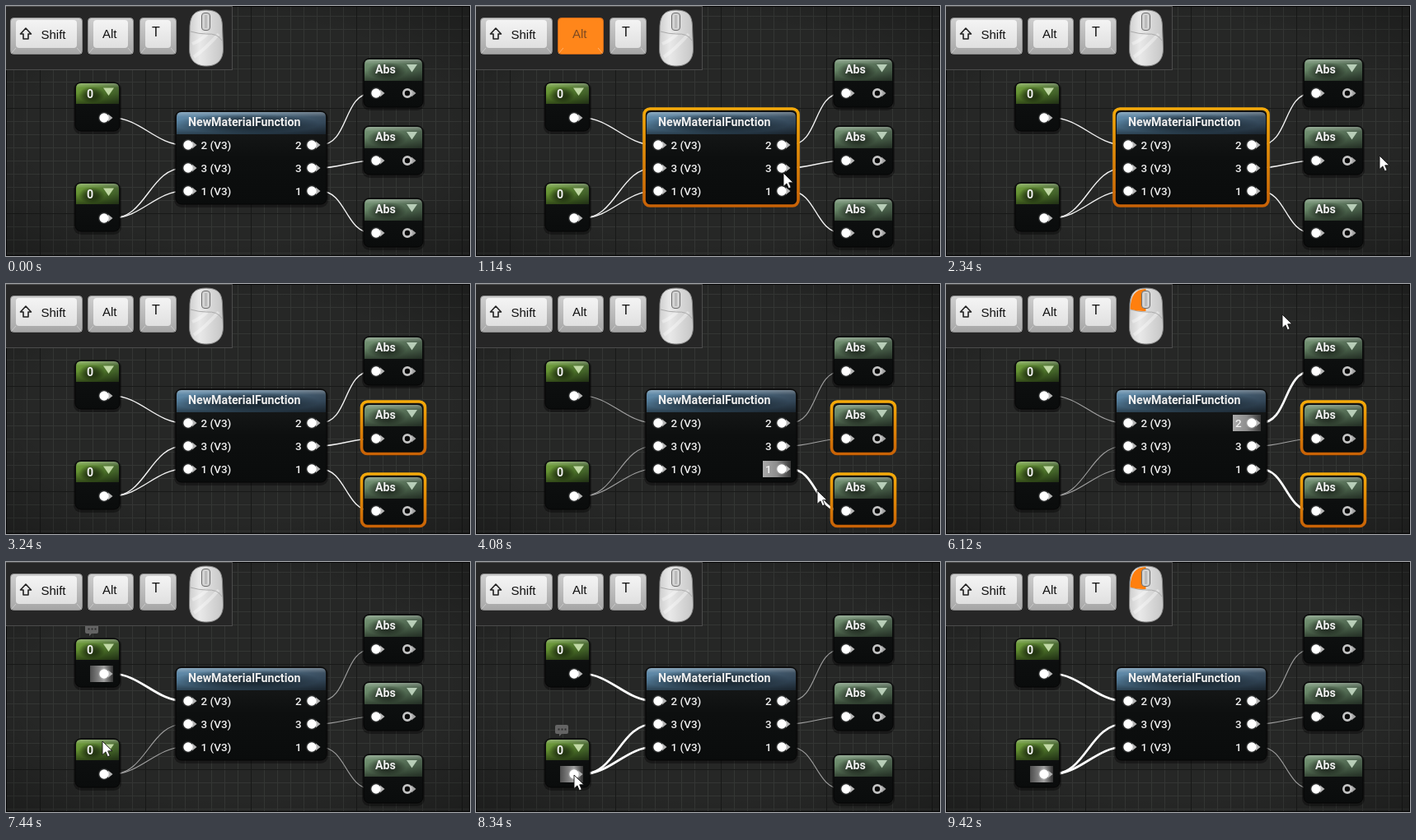
An HTML page that plays this animation: 563 px wide and 304 px high, repeating every 9.48 s.

```html
<!DOCTYPE html>
<html lang="en">
<head>
<meta charset="utf-8">
<title>Node graph wires</title>
<style>
html, body { margin: 0; width: 100%; height: 100%; overflow: hidden; background: #262726; }
svg { display: block; width: 563px; height: 304px; }
text { font-family: Roboto, "Open Sans", sans-serif; fill: #f0f0f0; }
.title { font-weight: bold; font-size: 14.2px; }
.label { font-weight: 500; font-size: 13.4px; }
.cap { font-family: "Liberation Sans", Arial, sans-serif; fill: #111; }
.down .rim { fill: #ff861a; stroke: #c9671a; }
.down .face { fill: #ff861a; }
.down .cap { fill: #7d4a22; }
.down .glyph { stroke: #b8621c; }
.glyph { fill: none; stroke: #222; stroke-width: 1.6; stroke-linejoin: round; }
.wire { fill: none; stroke: #f2f2f2; stroke-width: 1.4; }
.wire.dim { stroke: #a0a0a0; stroke-width: 1.1; }
.wire.hot { stroke: #fff; stroke-width: 2.7; }
</style>
</head>
<body>
<svg id="stage" viewBox="0 0 563 304" xmlns="http://www.w3.org/2000/svg">
  <defs>
    <pattern id="minor" width="16" height="16" patternUnits="userSpaceOnUse" x="9" y="12">
      <path d="M.5 0V16M0 .5H16" stroke="#343634" fill="none"/>
    </pattern>
    <pattern id="major" width="128" height="128" patternUnits="userSpaceOnUse" x="41" y="124">
      <path d="M.5 0V128M0 .5H128" stroke="#181918" fill="none"/>
    </pattern>
    <radialGradient id="vignette" r=".75">
      <stop offset=".6" stop-opacity="0"/><stop offset="1" stop-opacity=".3"/>
    </radialGradient>
    <linearGradient id="body" x2="0" y2="1">
      <stop stop-color="#1b1d1d"/><stop offset=".5" stop-color="#0d0f0f"/><stop offset="1" stop-color="#0a0c0c"/>
    </linearGradient>
    <linearGradient id="green"><stop stop-color="#6a9a34"/><stop offset=".55" stop-color="#527c2a"/><stop offset="1" stop-color="#41602a"/></linearGradient>
    <linearGradient id="sage"><stop stop-color="#6c8c6c"/><stop offset=".55" stop-color="#587458"/><stop offset="1" stop-color="#465c48"/></linearGradient>
    <linearGradient id="blue"><stop stop-color="#5a86a6"/><stop offset=".55" stop-color="#446680"/><stop offset="1" stop-color="#34485a"/></linearGradient>
    <linearGradient id="shade" x2="0" y2="1">
      <stop stop-color="#fff" stop-opacity=".32"/><stop offset=".22" stop-color="#fff" stop-opacity=".04"/>
      <stop offset=".5" stop-opacity=".05"/><stop offset="1" stop-opacity=".5"/>
    </linearGradient>
    <radialGradient id="smudge"><stop stop-opacity=".62"/><stop offset=".5" stop-opacity=".42"/><stop offset="1" stop-opacity="0"/></radialGradient>
    <linearGradient id="gold" x2="0" y2="1"><stop stop-color="#f5aa0a"/><stop offset="1" stop-color="#c86206"/></linearGradient>
    <linearGradient id="hover"><stop stop-color="#aaa"/><stop offset=".5" stop-color="#8d8d8d"/><stop offset="1" stop-color="#3a3a3a"/></linearGradient>
    <linearGradient id="hoverOut"><stop stop-color="#4d4d4d"/><stop offset=".6" stop-color="#a0a0a0"/><stop offset="1" stop-color="#333"/></linearGradient>
    <linearGradient id="rim" x2="0" y2="1"><stop stop-color="#cfcfcf"/><stop offset="1" stop-color="#a6a6a6"/></linearGradient>
    <linearGradient id="face" x2="0" y2="1"><stop stop-color="#f4f4f4"/><stop offset="1" stop-color="#e0e0e0"/></linearGradient>
    <linearGradient id="shell"><stop stop-color="#cfcfcf"/><stop offset=".3" stop-color="#e9e9e9"/><stop offset="1" stop-color="#c6c6c6"/></linearGradient>
  </defs>
  <rect width="563" height="304" fill="#262726"/>
  <rect width="563" height="304" fill="url(#minor)"/>
  <rect width="563" height="304" fill="url(#major)"/>
  <rect width="563" height="304" fill="url(#vignette)"/>
  <rect x=".5" y=".5" width="562" height="303" fill="none" stroke="#050505"/>
  <g id="wires"></g>
  <g id="nodes"></g>
  <rect id="marquee" fill="#fff" fill-opacity=".05" stroke="#ddd" stroke-dasharray="4 3"/>
  <g id="panel">
    <rect x="-1" y=".5" width="275.5" height="77" fill="#262626" stroke="#4c4c4c"/>
  </g>
  <path id="cursor" d="M0 0V16.5L3.9 12.9L6.4 18.8L9.2 17.6L6.7 11.8H12Z" fill="#fff" stroke="#111" stroke-width=".9"/>
</svg>
<script>
const LOOP = 9480, STEP = 60;
const $ = id => document.getElementById(id);

function add(parent, markup) {
  const g = document.createElementNS('http://www.w3.org/2000/svg', 'g');
  g.innerHTML = markup;
  return parent.appendChild(g);
}

// Graph
const tip = (x, y, color) => `<path d="M${x + 5} ${y - 4.5}L${x + 10.5} ${y}L${x + 5} ${y + 4.5}Z" fill="${color}"/>`;
const pin = (x, y) =>
  `<circle cx="${x}" cy="${y}" r="7.2" fill="#fff" opacity=".12"/>` + tip(x, y, '#b5b5b5') +
  `<circle cx="${x}" cy="${y}" r="5.7" fill="#fff"/>`;
const ring = (x, y) => tip(x, y, '#a5a5a5') +
  `<circle cx="${x}" cy="${y}" r="4.6" fill="#0a0a0a" stroke="#c4c4c4" stroke-width="2.8"/>`;
const arrow = (x, y, color) => `<path d="M${x} ${y}h13l-6.5 9.5z" fill="${color}"/>`;
const label = (x, y, text) => `<text class="label" x="${x}" y="${y + 5}">${text}</text>`;

function frame(x, y, w, h, head, tint) {
  const top = `M${x + 1} ${y + head}v${7 - head}q0-6 6-6h${w - 14}q6 0 6 6v${head - 7}z`;
  return `<rect x="${x - 2}" y="${y - 1}" width="${w + 4}" height="${h + 5}" rx="9" opacity=".35"/>
    <rect x="${x}" y="${y}" width="${w}" height="${h}" rx="7" fill="url(#body)" stroke="#050505"/>
    <path d="${top}" fill="url(#${tint})"/><path d="${top}" fill="url(#shade)"/>`;
}

const outline = (x, y, w, h) => add($('nodes'),
  `<rect x="${x}" y="${y}" width="${w}" height="${h}" rx="7" fill="none" stroke="url(#gold)" stroke-width="3.6"/>`);
const glow = (x, y, w, paint) => add($('nodes'),
  `<rect x="${x}" y="${y - 10}" width="${w}" height="20" fill="url(#${paint})"/>`);
const bubble = y => add($('nodes'),
  `<path d="M98 ${y}h12q2 0 2 2v7q0 2-2 2h-6l-3 3v-3h-3q-2 0-2-2v-7q0-2 2-2z" fill="#646464"/>
   <path d="M99.5 ${y + 5.5}h10" stroke="#2c2c2c" stroke-width="2" stroke-dasharray="2 2"/>`);

const constGlow = [93, 215].map(y => {
  add($('nodes'), frame(84, y, 54, 59, 26, 'green') +
    `<ellipse cx="104" cy="${y + 15}" rx="16" ry="10" fill="url(#smudge)"/>
     <text class="title" x="98" y="${y + 19}">0</text>` + arrow(118, y + 6.5, '#c0d8a4'));
  const g = glow(102, y + 43, 28, 'hoverOut');
  add($('nodes'), pin(119, y + 43));
  return g;
});

const rows = [[169, 2], [197, 3], [225, 1]];
add($('nodes'), frame(206, 128, 183, 113, 28, 'blue') +
  `<ellipse cx="292" cy="143" rx="88" ry="12" fill="url(#smudge)"/>
   <text class="title" x="221" y="146">NewMaterialFunction</text>`);
const outGlow = rows.map(([y, n]) => {
  add($('nodes'), pin(221, y) + label(236.5, y, n + ' (V3)'));
  const g = glow(348, y, 34, 'hover');
  add($('nodes'), label(351, y, n) + pin(371, y));
  return g;
});

[64, 146, 234].forEach(y => add($('nodes'), frame(434, y, 72, 59, 27, 'sage') +
  `<ellipse cx="462" cy="${y + 15}" rx="24" ry="11" fill="url(#smudge)"/>
   <text class="title" x="448" y="${y + 18}">Abs</text>` +
  arrow(486, y + 7, '#b8ceb8') + pin(449, y + 42) + ring(487, y + 42)));

const picked = [outline(204, 125, 187, 118), outline(431.5, 143, 77, 63.5), outline(431.5, 231, 77, 63.5)];
const notes = [bubble(76), bubble(198)];

// Tangents grow with the distance spanned
function wire(x1, y1, x2, y2) {
  const d = (x2 - x1 + Math.abs(y2 - y1)) * .28;
  return add($('wires'),
    `<path class="wire" d="M${x1} ${y1}C${x1 + d} ${y1} ${x2 - d} ${y2} ${x2} ${y2}"/>`).firstChild;
}
const wires = [
  wire(129, 136, 216, 169), wire(129, 258, 216, 197), wire(129, 258, 216, 225),
  wire(381, 169, 444, 106), wire(381, 197, 444, 188), wire(381, 225, 444, 276)
];

// Key panel
function key(x, w, text, tx, ty, size, glyph = '') {
  return add($('panel'),
    `<rect class="rim" x="${x + .5}" y="14.5" width="${w - 1}" height="44" rx="4" fill="url(#rim)" stroke="#8c8c8c"/>
     <path d="M${x + 1} 58l6-7M${x + w - 1} 58l-6-7" stroke="#fff" opacity=".35"/>
     <rect class="face" x="${x + 7}" y="17" width="${w - 14}" height="34" rx="4" fill="url(#face)"/>${glyph}
     <text class="cap" x="${tx}" y="${ty}" font-size="${size}">${text}</text>`);
}
const shift = key(5, 88, 'Shift', 42.5, 39.5, 15,
  '<path class="glyph" d="M24 27l6.5 7h-3.5v6h-6v-6h-3.5z"/>');
const alt = key(99, 56, 'Alt', 117, 39, 15);
const tKey = key(162, 45, 'T', 177, 37, 16);

add($('panel'),
  `<path d="M243 5C229 5 224 11 223 24L222.5 52C222.5 67 231 73 243 73S263.5 67 263.5 52L262.5 24C262 11 257 5 243 5Z"
     fill="url(#shell)" stroke="#858585"/>
   <path d="M228 62q14-10 30-28M226 46q10-4 18-12" stroke="#fff" stroke-width="4" opacity=".35" fill="none"/>
   <path d="M224 31q10 3 19 3q14-1 19 8" stroke="#aaa" fill="none"/>`);
const left = add($('panel'), '<path d="M242.5 6C230 6 224 14 223.5 30.5Q233 33.5 242.5 33Z" fill="#ff7f0e"/>');
add($('panel'), '<rect x="237.5" y="8.5" width="10" height="21" rx="3.5" fill="#d4d4d4" stroke="#6c6c6c"/><path d="M242.5 11v16" stroke="#bbb" stroke-width="3"/>');
const wheel = add($('panel'), '<rect x="237.5" y="10" width="10" height="19" rx="3.5" fill="#ff7f0e"/>');

// Pairs of on and off times
const shown = [
  [picked[0], 480, 2460], [picked[1], 2520, 6180], [picked[2], 2760, 6180],
  [outGlow[0], 4860, 6180], [outGlow[1]], [outGlow[2], 4080, 5520],
  [constGlow[0], 6900, 8280], [constGlow[1], 8280, LOOP],
  [notes[0], 7140, 7500], [notes[1], 8340, 8640],
  [left, 420, 540, 2400, 3060, 4560, 4680, 4860, 5040, 6120, 6240, 9420, LOOP],
  [wheel, 7140, 7260, 8400, 8520],
  [$('marquee'), 2460, 3060]
];
const pressed = [
  [shift, 4500, 5160],
  [alt, 900, 1200, 2040, 2160, 4140, 4320, 5400, 5520],
  [tKey, 960, 1140]
];
const hot = [
  [wires[0], 6900, LOOP], [wires[1], 8280, LOOP], [wires[2], 8280, LOOP],
  [wires[3], 4860, 6180], [wires[4]], [wires[5], 4080, 6180]
];

// Pointer paths: time, x, y
const paths = [
  [[60, 493, 150], [420, 330, 143], [600, 330, 144], [960, 352, 190],
   [1020, 356, 195], [1440, 440, 235], [1920, 526, 182], [2400, 526, 182],
   [2880, 474, 264], [3000, 474, 264], [3200, 562, 303]],
  [[3480, 552, 190], [3960, 414, 251], [4620, 411, 250], [4860, 407, 137],
   [5040, 407, 137], [5340, 421, 251], [5460, 421, 251], [5760, 408, 37],
   [6180, 408, 37], [6900, 119, 136], [7200, 119, 137], [7440, 117, 218],
   [7620, 117, 255], [7920, 122, 290], [8040, 122, 290], [8280, 119, 259],
   [8520, 119, 259], [8760, 412, 175], [8940, 381, 168], [9180, 551, 50]]
];

const active = ([, ...times], t) => times.some((a, i) => i % 2 === 0 && t >= a && t < times[i + 1]);

function pointer(t) {
  const path = paths.find(p => t >= p[0][0] && t <= p[p.length - 1][0]);
  if (!path) return null;
  const i = Math.max(1, path.findIndex(p => p[0] >= t));
  const [t0, x0, y0] = path[i - 1], [t1, x1, y1] = path[i];
  const u = (t - t0) / (t1 - t0), k = u * u * (3 - 2 * u);
  return [x0 + (x1 - x0) * k, y0 + (y1 - y0) * k];
}

function draw(t) {
  shown.forEach(row => row[0].style.display = active(row, t) ? '' : 'none');
  pressed.forEach(row => row[0].classList.toggle('down', active(row, t)));
  const anyHot = hot.some(row => active(row, t));
  hot.forEach(row => {
    const on = active(row, t);
    row[0].classList.toggle('hot', on);
    row[0].classList.toggle('dim', anyHot && !on);
  });
  const at = pointer(t), cursor = $('cursor');
  cursor.style.display = at ? '' : 'none';
  if (!at) return;
  const [x, y] = at.map(Math.round);
  cursor.setAttribute('transform', `translate(${x} ${y})`);
  const box = { x: Math.min(x, 526) + .5, y: Math.min(y, 182) + .5, width: Math.abs(526 - x), height: Math.abs(y - 182) };
  for (const k in box) $('marquee').setAttribute(k, box[k]);
}

const start = performance.now();
function tick(now) {
  const t = Math.max(0, now - start) % LOOP;
  draw(Math.floor(t / STEP) * STEP);
  requestAnimationFrame(tick);
}
draw(0);
requestAnimationFrame(tick);
</script>
</body>
</html>
```
